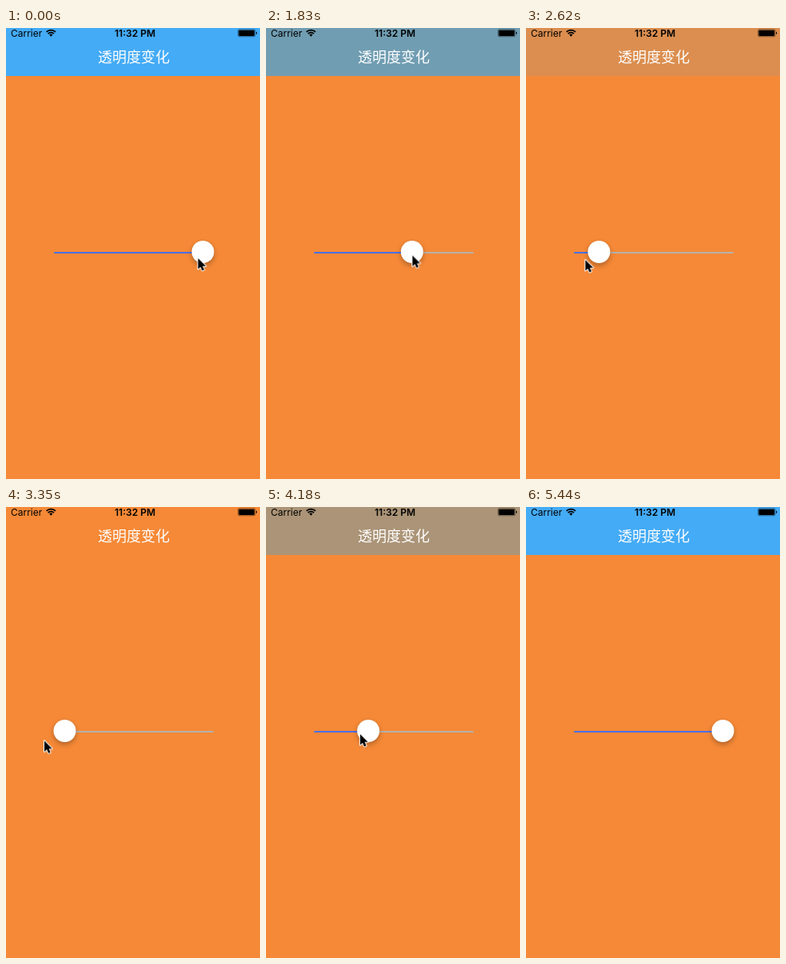
An HTML page for the animation above (6250 ms loop, 318 by 564 pixels).

```html
<!DOCTYPE html>
<html lang="zh-CN">
<head>
<meta charset="utf-8">
<title>透明度变化</title>
<style>
@property --x { syntax: "<number>"; inherits: true; initial-value: 246.5; }

html, body { margin: 0; width: 100%; height: 100%; overflow: hidden; }
body { background: #f58937; }

.stage { position: absolute; left: 0; top: 0; width: 318px; height: 564px; overflow: hidden; }
.stage > * { position: absolute; left: 0; top: 0; }

.bar { width: 318px; height: 60px; animation: tint 6250ms linear infinite; }
.bar svg { display: block; }
.status { font: 12px Inter, Roboto, sans-serif; }
.clock { font-weight: 600; text-anchor: middle; }
.title { font: 18px "Noto Sans CJK SC", "Noto Sans CJK", sans-serif; fill: #fff; text-anchor: middle; }

/* --x is the centre of the thumb */
.slider { width: 318px; height: 564px; animation: slide 6250ms linear infinite; }
.slider div { position: absolute; }
.track, .fill { left: 60px; top: 280px; height: 2px; border-radius: 1px; }
.track { width: 200px; background: #b5b1ac; }
.fill { width: calc((var(--x) - 60) * 1px); background: #4a6fea; }
.thumb {
  left: -14px; top: 266px; width: 28px; height: 28px; border-radius: 50%;
  background: #fff;
  box-shadow: 0 0 1px rgba(0, 0, 0, .12), 0 3px 6px rgba(0, 0, 0, .28);
  transform: translateX(calc(var(--x) * 1px));
}

.cursor { width: 16px; height: 20px; overflow: visible; animation: point 6250ms linear infinite; }

@keyframes slide {
  0%, 10.39% { --x: 246.5; }
  10.4%, 17.1% { --x: 232; }
  22.56% { --x: 220.5; }
  27.36% { --x: 197; }
  35.36% { --x: 138.5; }
  37.6% { --x: 122; }
  41.92% { --x: 91.5; }
  44.48%, 55.6% { --x: 73.5; }
  59.2% { --x: 93.5; }
  63.2% { --x: 105; }
  67.2% { --x: 130; }
  70.4% { --x: 167; }
  73.92% { --x: 217.5; }
  76.48%, 100% { --x: 246.5; }
}

@keyframes tint {
  0%, 10.39% { background: rgb(68, 171, 246); }
  10.4%, 17.1% { background: rgb(72, 167, 230); }
  22.56% { background: rgb(74, 164, 217); }
  27.36% { background: rgb(97, 160, 193); }
  35.36% { background: rgb(157, 149, 130); }
  37.6% { background: rgb(179, 146, 112); }
  41.92% { background: rgb(219, 142, 79); }
  44.48%, 55.6% { background: rgb(245, 137, 55); }
  59.2% { background: rgb(217, 142, 81); }
  63.2% { background: rgb(202, 144, 93); }
  67.2% { background: rgb(168, 148, 121); }
  70.4% { background: rgb(128, 154, 160); }
  73.92% { background: rgb(77, 165, 216); }
  76.48%, 100% { background: rgb(68, 171, 246); }
}

@keyframes point {
  0%, 2% { transform: translate(240.5px, 288px); }
  4.8%, 17.1% { transform: translate(242px, 286px); }
  22.56% { transform: translate(228.5px, 284px); }
  27.36% { transform: translate(200.5px, 284px); }
  35.36% { transform: translate(129.5px, 286px); }
  37.6% { transform: translate(109.5px, 288px); }
  41.92% { transform: translate(74.5px, 290px); }
  44.48% { transform: translate(54px, 292px); }
  46.88%, 53.1% { transform: translate(46.5px, 293px); }
  55.6% { transform: translate(54px, 290px); }
  59.2% { transform: translate(78.5px, 285px); }
  63.2% { transform: translate(92px, 285px); }
  67.2% { transform: translate(120px, 284px); }
  70.4% { transform: translate(163px, 279px); }
  73.92% { transform: translate(224.5px, 270px); }
  76.48% { transform: translate(258px, 265px); }
  83.68%, 84.16% { transform: translate(295.5px, 261px); }
  84.64% { transform: translate(298px, 268px); }
  85.6% { transform: translate(304px, 300px); }
  86.56% { transform: translate(314px, 354px); }
  87.04%, 100% { transform: translate(340px, 380px); }
}
</style>
</head>
<body>
<div class="stage">
  <div class="bar">
    <svg width="318" height="60">
      <g class="status">
        <text x="6" y="10.6">Carrier</text>
        <text class="clock" x="161.5" y="10.6">11:32 PM</text>
      </g>
      <g fill="none" stroke="#000" stroke-width="1.7">
        <path d="M50.6 4.9a8.1 8.1 0 0 1 11.4 0"/>
        <path d="M52.6 7.1a5.2 5.2 0 0 1 7.4 0"/>
      </g>
      <path d="M54.2 8.6a3 3 0 0 1 4.2 0L56.3 10.7Z"/>
      <rect x="290.5" y="1.8" width="21.5" height="9" rx="1.6" fill="none" stroke="#000" stroke-opacity=".55" stroke-width=".8"/>
      <rect x="291.4" y="2.7" width="19.7" height="7.2" rx=".8"/>
      <path d="M313 4.5a2 2 0 0 1 0 3.6Z"/>
      <text class="title" x="160" y="42.5">透明度变化</text>
    </svg>
  </div>
  <div class="slider">
    <div class="track"></div>
    <div class="fill"></div>
    <div class="thumb"></div>
  </div>
  <svg class="cursor">
    <path d="M0 0V13.6L3.1 10.7 5.2 15.4 7.6 14.3 5.5 9.8H9.7Z" stroke="#fff" stroke-width="2" paint-order="stroke" stroke-linejoin="round"/>
  </svg>
</div>
</body>
</html>
```
